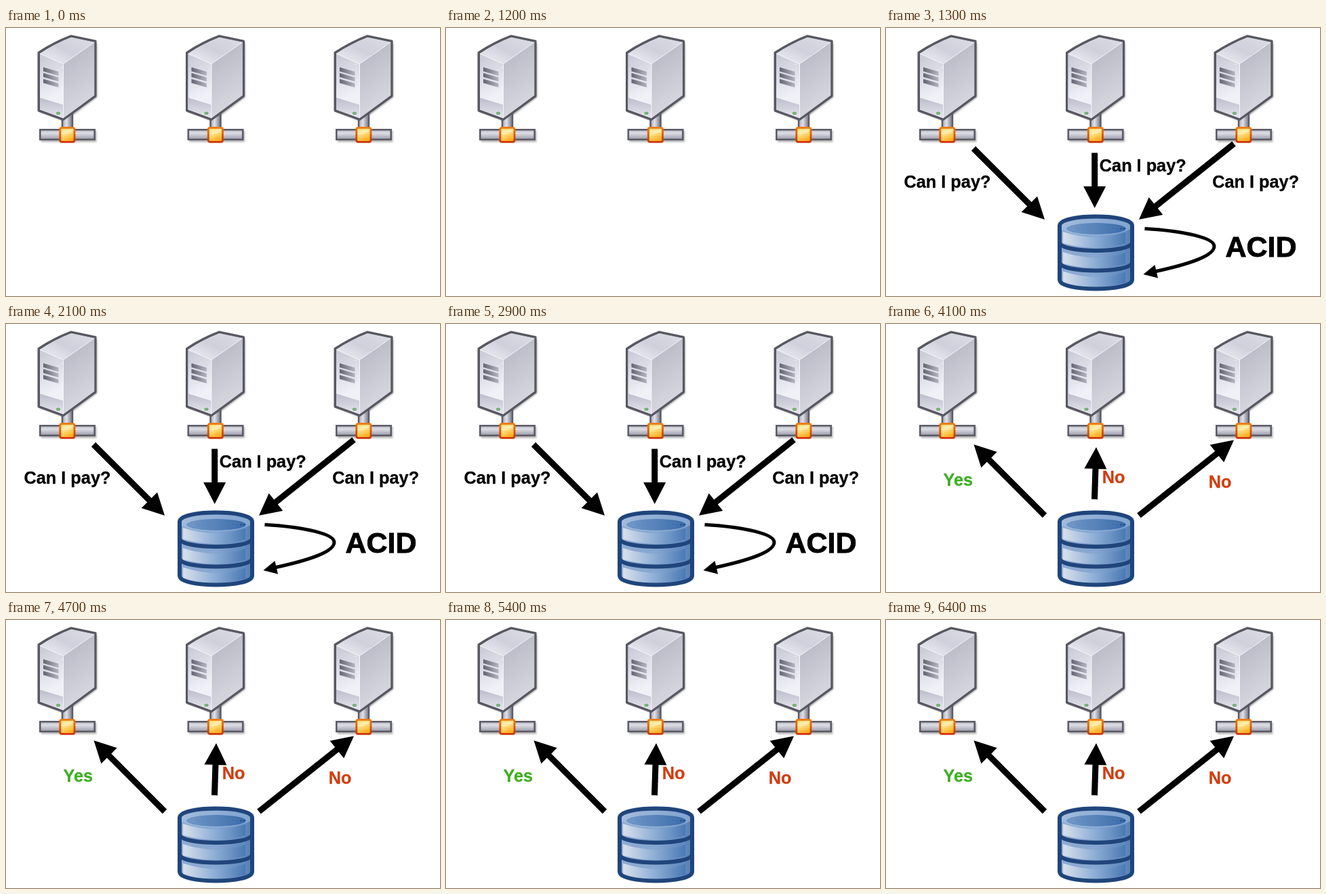
An HTML page that plays this animation: 640 px wide and 396 px high, repeating every 6500 ms.

```html
<!DOCTYPE html>
<html lang="en">
<head>
<meta charset="utf-8">
<title>Database requests</title>
<style>
html, body { margin: 0; width: 100%; height: 100%; overflow: hidden; background: #fff; }
svg { display: block; width: 100%; height: 100%; }
text { font: bold 25.3px "Liberation Sans", Arial, sans-serif; stroke: #000; stroke-width: .3; }
.big { font-size: 43px; stroke-width: .9; }
.yes { fill: #3fae22; stroke: #3fae22; }
.no { fill: #d13c10; stroke: #d13c10; }
</style>
</head>
<body>
<svg viewBox="0 0 640 396">
  <defs>
    <linearGradient id="top" x1="0" y1="1" x2="1" y2="0">
      <stop offset="0" stop-color="#f0f0f7"/><stop offset=".5" stop-color="#d0d0dc"/><stop offset="1" stop-color="#dcdce6"/>
    </linearGradient>
    <linearGradient id="side" x1="0" y1="0" x2=".3" y2="1">
      <stop offset="0" stop-color="#b4b4c2"/><stop offset="1" stop-color="#d8d8e0"/>
    </linearGradient>
    <linearGradient id="front" x1="0" y1="0" x2=".2" y2="1">
      <stop offset="0" stop-color="#c8c8d6"/><stop offset=".75" stop-color="#f0f0f7"/>
    </linearGradient>
    <linearGradient id="base" x1="0" y1="0" x2="0" y2="1">
      <stop offset="0" stop-color="#bcbccd"/><stop offset="1" stop-color="#e6e6ef"/>
    </linearGradient>
    <linearGradient id="slot">
      <stop offset="0" stop-color="#646472"/><stop offset="1" stop-color="#b4b4c2"/>
    </linearGradient>
    <linearGradient id="pipe" x1="0" y1="0" x2="0" y2="1">
      <stop offset="0" stop-color="#b8b8c4"/><stop offset=".35" stop-color="#dedee6"/><stop offset="1" stop-color="#9a9aaa"/>
    </linearGradient>
    <linearGradient id="stem">
      <stop offset="0" stop-color="#a4a4b0"/><stop offset=".4" stop-color="#e2e2ea"/><stop offset="1" stop-color="#747482"/>
    </linearGradient>
    <linearGradient id="node" x1="0" y1="0" x2=".4" y2="1">
      <stop offset="0" stop-color="#ffd24a"/><stop offset=".45" stop-color="#ffe58c"/><stop offset="1" stop-color="#ffae20"/>
    </linearGradient>
    <linearGradient id="rim" x1="0" y1="0" x2="0" y2="1">
      <stop offset="0" stop-color="#ee7a10"/><stop offset="1" stop-color="#cc3600"/>
    </linearGradient>
    <linearGradient id="drum">
      <stop offset="0" stop-color="#8fabd2"/><stop offset=".5" stop-color="#85a6d0"/><stop offset="1" stop-color="#5580b8"/>
    </linearGradient>
    <linearGradient id="panel">
      <stop offset="0" stop-color="#d9e0ec"/><stop offset=".5" stop-color="#8fafd6"/><stop offset="1" stop-color="#4a79b3"/>
    </linearGradient>
    <linearGradient id="rimTop">
      <stop offset="0" stop-color="#a3bcdc"/><stop offset="1" stop-color="#7fa2cf"/>
    </linearGradient>
    <linearGradient id="lid">
      <stop offset="0" stop-color="#7198c8"/><stop offset="1" stop-color="#3a6ca9"/>
    </linearGradient>
    <filter id="blur" x="-20%" y="-20%" width="140%" height="140%"><feGaussianBlur stdDeviation="1.3"/></filter>

    <g id="server">
      <g fill="#777" opacity=".55" filter="url(#blur)" transform="translate(2.5 2.5)">
        <path d="M48 37L96 12L132 20V100L84 136L48 122Z"/>
        <path d="M49 149H131V166H49Z"/>
      </g>
      <path d="M83 126H98V150H83Z" fill="url(#stem)" stroke="#5c5c68" stroke-width="2.5"/>
      <path d="M50.3 150.3H130.7V164.7H50.3Z" fill="url(#pipe)" stroke="#5c5c68" stroke-width="2.6"/>
      <path d="M48.3 36.5Q70 22 96 12L131.8 19.5V100.5L84.5 135L48.3 122Z" fill="#ccc" stroke="#585862" stroke-width="3.6" stroke-linejoin="round"/>
      <path d="M50 38Q71 23.5 96 13.8L130.3 21L84.5 53Z" fill="url(#top)"/>
      <path d="M84.5 53L130.3 21V99.5L84.5 133.3Z" fill="url(#side)"/>
      <path d="M50 38L84.5 53V133.3L50 120.5Z" fill="url(#front)"/>
      <path d="M50 103L84.5 113.5V133.3L50 120.5Z" fill="url(#base)"/>
      <path d="M50 38L84.5 53L130.3 21M84.5 53V133" fill="none" stroke="#f4f4fa" stroke-width="1"/>
      <g fill="url(#slot)">
        <path id="vent" d="M55 58L77.5 64.5V70.5L55 64Z"/>
        <use href="#vent" y="8.6"/>
        <use href="#vent" y="17.2"/>
      </g>
      <ellipse cx="77" cy="126" rx="2.8" ry="1.7" fill="#7cbf78" stroke="#5c965c" stroke-width=".8"/>
      <rect x="79.8" y="147.3" width="21.2" height="21" rx="2.5" fill="url(#node)" stroke="url(#rim)" stroke-width="2.8"/>
      <path d="M82.5 157Q90 158 98 154V149.8H82.5Z" fill="#fff" opacity=".3"/>
    </g>

    <g id="db">
      <path d="M256 292V372C256 390 363 390 363 372V292Z" fill="url(#drum)"/>
      <ellipse cx="309.5" cy="292.5" rx="53.5" ry="14" fill="url(#rimTop)"/>
      <g fill="url(#panel)">
        <path id="band" d="M261 301Q309 317 353 302V318Q309 331 261 318Z"/>
        <use href="#band" y="30"/>
        <use href="#band" y="58.5"/>
      </g>
      <ellipse cx="310" cy="296.5" rx="44" ry="8.5" fill="url(#lid)"/>
      <path d="M346 296.5h1.5M350 296.5h1.5" stroke="#142c4c" stroke-width="1.5"/>
      <g fill="none" stroke="#1f457c" stroke-width="6">
        <path d="M256 292V372C256 390 363 390 363 372V292C363 274 256 274 256 292"/>
        <path id="ring" d="M256 317C258 333 361 333 363 317"/>
        <use href="#ring" y="29.5"/>
      </g>
    </g>
  </defs>

  <rect width="640" height="396" fill="#fff"/>
  <use href="#server"/>
  <use href="#server" x="218.5"/>
  <use href="#server" x="437"/>
  <use id="store" href="#db"/>

  <g id="ask">
    <g class="arrows"></g>
    <path d="M381.5 296.5C440 300 484 310 484 322.5C484 337 446 349 396 360" fill="none" stroke="#000" stroke-width="5"/>
    <path d="M379.5 364L396.5 350L401 369.5Z"/>
    <text x="26.5" y="236">Can I pay?</text>
    <text x="314.8" y="212">Can I pay?</text>
    <text x="481.2" y="235.5">Can I pay?</text>
    <text class="big" x="500.5" y="338">ACID</text>
  </g>
  <g id="reply">
    <g class="arrows"></g>
    <text class="yes" x="84.5" y="239">Yes</text>
    <text class="no" x="318.8" y="235">No</text>
    <text class="no" x="475.8" y="242">No</text>
  </g>
</svg>
<script>
const LOOP = 6500, ASK_AT = 1300, REPLY_AT = 3900;
const $ = s => document.querySelector(s);
const store = $('#store'), ask = $('#ask'), reply = $('#reply');

// Solid arrow from (x1,y1) to its tip (x2,y2)
function arrow(x1, y1, x2, y2) {
  const len = Math.hypot(x2 - x1, y2 - y1);
  const turn = Math.atan2(y2 - y1, x2 - x1) * 180 / Math.PI;
  const neck = len - 32;
  return `<path transform="translate(${x1} ${y1}) rotate(${turn})"
    d="M0 -4.5H${neck}V-16.5L${len} 0L${neck} 16.5V4.5H0Z"/>`;
}

const draw = (group, list) =>
  group.querySelector('.arrows').innerHTML = list.map(a => arrow(...a)).join('');

draw(ask, [[129, 178, 234, 283], [307.7, 184.5, 307.7, 266], [513, 171, 373, 283]]);
draw(reply, [[234, 283, 129.5, 178], [307.5, 259, 310, 182], [373, 283, 513, 171.5]]);

const show = (el, on) => el.setAttribute('visibility', on ? 'visible' : 'hidden');

function render(t) {
  show(store, t >= ASK_AT);
  show(ask, t >= ASK_AT && t < REPLY_AT);
  show(reply, t >= REPLY_AT);
}

const start = performance.now();
function tick() {
  render((performance.now() - start) % LOOP);
  requestAnimationFrame(tick);
}
tick();
</script>
</body>
</html>
```
